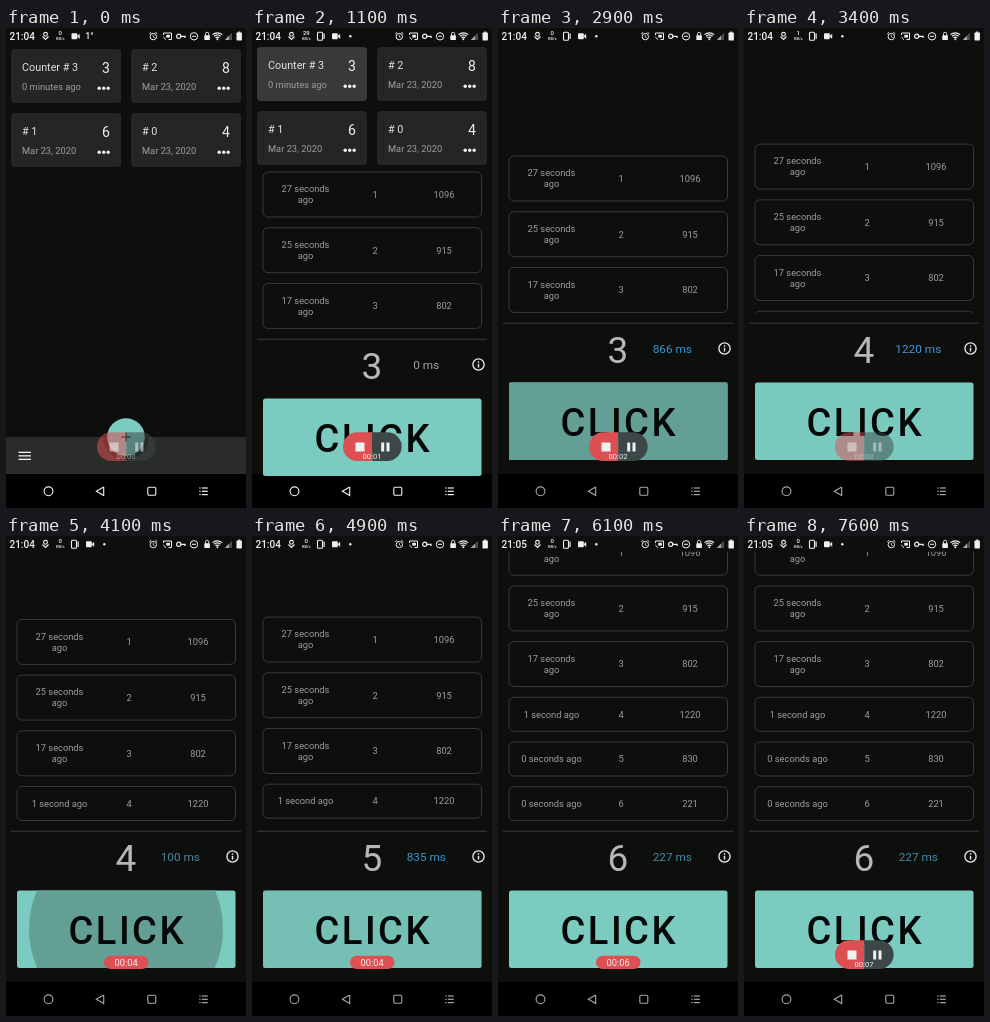
Animation, 240 px wide and 480 px high, one loop 7.9 s. Source, as an HTML page with a canvas:

```html
<!DOCTYPE html>
<html lang="en">
<head>
<meta charset="utf-8">
<title>Click counter</title>
<style>
html, body { margin: 0; width: 100%; height: 100%; overflow: hidden; background: #0d0f0d }
canvas { display: block; width: 240px; height: 480px }
</style>
</head>
<body>
<canvas id="stage"></canvas>
<script>
const LOOP = 7900, STEP = 100;
const BG = '#0d0f0d', TEAL = '#7ccbc0', RED = '#dc5054', LINE = '#383a38', GREY = '#9c9e9c', WHITE = '#f0f0f0';
const ROW_SHIFT = 44.6;
const presses = [[2034, 1220], [4000, 835], [5470, 227]]; // start, length
const rows = [
  ['27 seconds\nago', 1096], ['25 seconds\nago', 915], ['17 seconds\nago', 802],
  ['1 second ago', 1220], ['0 seconds ago', 830], ['0 seconds ago', 221]
];

const stage = document.getElementById('stage');
const ratio = window.devicePixelRatio || 1;
stage.width = 240 * ratio;
stage.height = 480 * ratio;
const c = stage.getContext('2d');

const clamp = x => Math.max(0, Math.min(1, x));
const ramp = (t, from, to) => clamp((t - from) / (to - from));
const easeInOut = x => x < .5 ? 2 * x * x : 1 - 2 * (1 - x) ** 2;

function text(s, x, y, size, color = WHITE, align = 'center', weight = 400, spacing = 0) {
  c.font = `${weight} ${size}px Roboto, sans-serif`;
  c.letterSpacing = spacing + 'px';
  c.textAlign = align;
  c.fillStyle = color;
  c.fillText(s, x, y + size * .355); // y is the middle of the capitals
}
function rect(x, y, w, h, color) {
  c.fillStyle = color;
  c.fillRect(x, y, w, h);
}
function paint(color, stroke) {
  if (stroke) {
    c.lineWidth = stroke;
    c.strokeStyle = color;
    c.stroke();
  } else {
    c.fillStyle = color;
    c.fill();
  }
}
function round(x, y, w, h, r, color, stroke) {
  c.beginPath();
  c.roundRect(x, y, w, h, r);
  paint(color, stroke);
}
function circle(x, y, r, color, stroke) {
  c.beginPath();
  c.arc(x, y, r, 0, 7);
  paint(color, stroke);
}
function path(points, color, stroke) {
  c.beginPath();
  for (let i = 0; i < points.length; i += 2) c.lineTo(points[i], points[i + 1]);
  if (!stroke) c.closePath();
  paint(color, stroke);
}
function clipped(x, y, w, h, draw) {
  c.save();
  c.beginPath();
  c.rect(x, y, w, h);
  c.clip();
  draw();
  c.restore();
}
function faded(alpha, draw) {
  c.save();
  c.globalAlpha = alpha;
  draw();
  c.restore();
}

function card(x, y, name, age, count, lit) {
  round(x, y, 110, 54, 4, '#242624');
  if (lit) faded(lit, () => round(x, y, 110, 54, 4, '#383a38'));
  text(name, x + 11, y + 18.5, 10.8, '#e2e2e2', 'left');
  text(age, x + 11, y + 37.5, 9.3, GREY, 'left');
  text(count, x + 95, y + 19, 14, WHITE);
  for (const dx of [88.2, 92.7, 97.2]) circle(x + dx, y + 39.3, 1.7, WHITE);
}

function home(t) {
  c.save();
  c.translate(0, -6 * ramp(t, 950, 1400));
  card(5, 21, 'Counter # 3', '0 minutes ago', 3, ramp(t, 700, 1000));
  card(125, 21, '# 2', 'Mar 23, 2020', 8);
  card(5, 85, '# 1', 'Mar 23, 2020', 6);
  card(125, 85, '# 0', 'Mar 23, 2020', 4);
  rect(0, 409, 240, 37, '#2a2c2a');
  clipped(0, 409, 240, 37, () => circle(120, 409, 23, BG));
  circle(120, 409, 18.8, TEAL);
  rect(115.5, 408.4, 9, 1.2, '#111');
  rect(119.4, 404.5, 1.2, 9, '#111');
  for (const y of [423.7, 427.2, 430.7]) rect(12.5, y, 12.5, 1.3, WHITE);
  c.restore();
}

function list(t) {
  const shift = presses.reduce((sum, [start, length]) =>
    sum + ROW_SHIFT * easeInOut(ramp(t, start + length, start + length + 400)), 0);
  let y = 128 - shift;
  rows.forEach(([age, ms], i) => {
    const lines = age.split('\n'), h = lines.length > 1 ? 45 : 34, mid = y + h / 2;
    round(11, y, 218.5, h, 5, LINE, 1);
    lines.forEach((s, k) => text(s, 53.5, mid + (k - (lines.length - 1) / 2) * 11, 9.3, GREY));
    text(i + 1, 123, mid, 9.3, GREY);
    text(ms, 192, mid, 9.3, GREY);
    y += h + 10.7;
  });
}

function clickButton(t) {
  round(11, 354.5, 218.5, 77.5, 2.5, TEAL);
  for (const [start, length] of presses) {
    if (t < start) continue;
    const held = t - start, alpha = Math.exp(-Math.max(0, held - length) / 50);
    const radius = Math.min(130, 60 + held * .37);
    clipped(11, 354.5, 218.5, 77.5, () =>
      faded(alpha, () => circle(120, 393, radius, '#649f95')));
  }
  text('CLICK', 121.2, 394.5, 38, '#050807', 'center', 500, 2.5);
}

function detail(t) {
  const p = ramp(t, 950, 1400), top = 446 * (1 - p) ** 2.9;
  clipped(0, top, 240, 480, () => {
    rect(0, 0, 240, 446, BG);
    c.translate(0, 36 * (1 - p) ** 2);
    clipped(0, 15.5, 240, 269.7, () => list(t));
    rect(5, 294.7, 230, 1, LINE);
    let ms = 0, count = 3;
    for (const [start, length] of presses) {
      if (t >= start) ms = Math.min(length, t - start);
      if (t >= start + length) count++;
    }
    const tint = ms ? `hsl(${197 + ms / 120} ${30 + 35 * clamp(ms / 800)}% ${44 + ms / 100}%)` : '#a0a2a0';
    text(count, 119.8, 321.8, 37, '#b6b8b6');
    text(ms + ' ms', 174.3, 320.8, 11.8, tint);
    circle(226.5, 320.5, 5.6, WHITE, 1.3);
    rect(225.8, 319.8, 1.4, 3.7, WHITE);
    rect(225.8, 317.3, 1.4, 1.4, WHITE);
    clickButton(t);
  });
}

function statusBar(t) {
  rect(0, 0, 240, 15.5, BG);
  text(t < 5200 ? '21:04' : '21:05', 3.5, 8.3, 10, WHITE, 'left', 500);
  circle(39.5, 6.3, 1.9, WHITE, 1.1);
  path([36.5, 8.5, 39.5, 11.5, 42.5, 8.5], WHITE, 1.2);
  text([0, 29, 0, 1][Math.floor(t / 1000)] ?? 0, 54.3, 5.3, 6, WHITE, 'center', 500);
  text('KB/s', 54.3, 10.7, 4, WHITE, 'center', 500);
  const camera = x => {
    round(x - 4, 5.3, 5.8, 6, 1, WHITE);
    path([x + 1.5, 8.3, x + 4.2, 5.7, x + 4.2, 10.9], WHITE);
  };
  if (t < 200) {
    camera(69.5);
    text('1°', 83.5, 8.3, 9, WHITE, 'center', 500);
  } else {
    round(65.5, 4.2, 5, 8, 1, WHITE, 1.1);
    rect(71.5, 5.5, 1.2, 5.5, WHITE);
    camera(84);
    circle(98.3, 8.3, 1.2, WHITE);
  }
  // alarm
  circle(147.3, 8.6, 3.2, WHITE, 1);
  path([147.3, 6.8, 147.3, 8.9, 148.7, 9.6], WHITE, .8);
  path([143.3, 5.8, 145.2, 4.2], WHITE, 1);
  path([149.4, 4.2, 151.3, 5.8], WHITE, 1);
  // cast
  path([157.5, 7, 157.5, 5, 165.5, 5, 165.5, 11.5, 162.5, 11.5], WHITE, 1);
  rect(160.3, 6.8, 3.6, 2.8, WHITE);
  path([157.3, 9, 160, 11.7], WHITE, 1);
  // key
  circle(172.7, 8.3, 2.1, WHITE, 1.2);
  path([174.8, 8.3, 179, 8.3, 179, 10], WHITE, 1.3);
  // do not disturb
  circle(188, 8.3, 3.7, WHITE, 1);
  rect(186, 7.8, 4, 1, WHITE);
  // lock
  round(198.3, 7.3, 5.6, 4.8, .7, WHITE);
  round(199.5, 4.3, 3.2, 5, 1.5, WHITE, .9);
  // wifi
  for (const r of [2.8, 5, 7.2]) {
    c.beginPath();
    c.arc(211.3, 12, r, -2.3, -.84);
    paint(WHITE, 1.2);
  }
  circle(211.3, 11.3, 1, WHITE);
  // signal and battery
  path([218.8, 12, 226, 12, 226, 4.8], '#4c4e4c');
  path([218.8, 12, 223, 12, 223, 7.8], '#a8aaa8');
  rect(232, 3.6, 2.4, 1.2, WHITE);
  round(230.5, 4.5, 5.4, 8, .7, WHITE);
}

function navIcons(t) {
  faded(1 - .3 * ramp(t, 2400, 2900), () => {
    circle(42.5, 463.3, 4.4, WHITE, 1.1);
    path([97.7, 459, 90.3, 463.3, 97.7, 467.6, 97.7, 459], WHITE, 1.1);
    round(141.8, 459.3, 8, 8, 1.3, WHITE, 1.1);
    for (const y of [460, 463.3, 466.6]) {
      rect(193.3, y - .6, 1.3, 1.2, WHITE);
      rect(195.8, y - .6, 6, 1.2, WHITE);
    }
  });
}

function recorder(t) {
  const clock = '00:0' + Math.floor(t / 1000);
  const open = t < 3000 ? .55 + .45 * ramp(t, 0, 300)
    : t < 6000 ? 1 - ramp(t, 3200, 3600) : ramp(t, 6700, 7100);
  const small = t < 6000 ? ramp(t, 3500, 3800) : 1 - ramp(t, 6700, 6900);
  if (t > 3000 && small) faded(small, () => {
    round(98, 419.8, 44.5, 13.2, 6.6, RED);
    text(clock, 120.2, 426.5, 9.3);
  });
  if (open) faded(open, () => {
    round(91, 404.3, 29.3, 28.7, [14.3, 0, 0, 14.3], RED);
    round(120.3, 404.3, 29.3, 28.7, [0, 14.3, 14.3, 0], '#3c4748');
    rect(103.5, 414.5, 9, 9, WHITE);
    rect(129.2, 414.5, 3, 9, WHITE);
    rect(134.5, 414.5, 3, 9, WHITE);
    text(clock, 120, 428.3, 7.6);
  });
}

function draw(now) {
  const t = Math.floor(now % LOOP / STEP) * STEP;
  c.setTransform(ratio, 0, 0, ratio, 0, 0);
  rect(0, 0, 240, 446, BG);
  rect(0, 446, 240, 34, '#000');
  if (t < 1400) home(t);
  if (t > 950) detail(t);
  statusBar(t);
  navIcons(t);
  recorder(t);
}

let begin;
function frame(now) {
  begin ??= now;
  draw(now - begin);
  requestAnimationFrame(frame);
}
requestAnimationFrame(frame);
</script>
</body>
</html>
```
